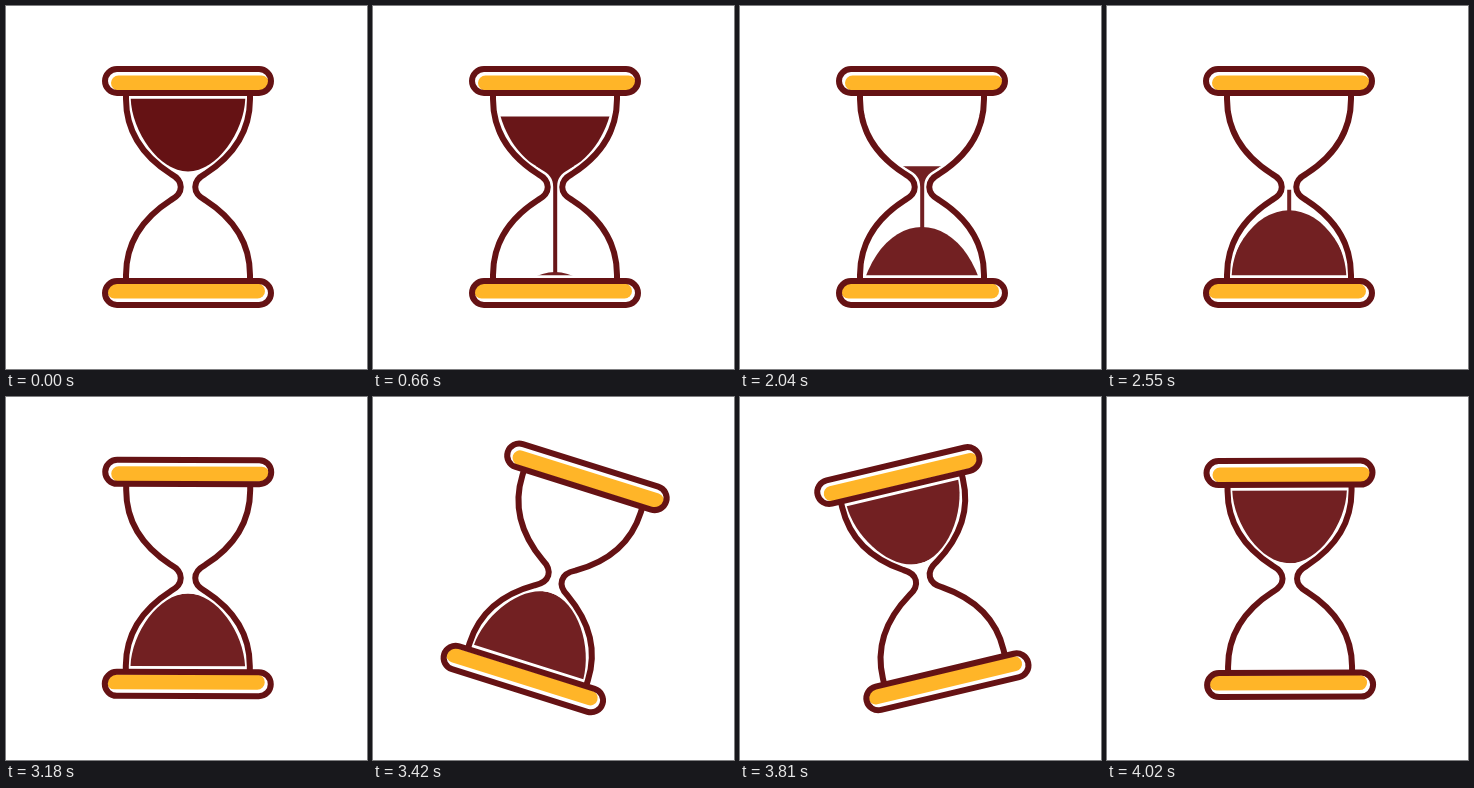
Recreate the animation shown at these times as an HTML page. Size 361 by 363 pixels, loop 4050 ms.

```html
<!DOCTYPE html>
<html lang="en">
<head>
<meta charset="utf-8">
<title>Hourglass</title>
<style>
  html, body { margin: 0; width: 100%; height: 100%; overflow: hidden; background: #fff; }
  svg { display: block; width: 361px; height: 363px; }
</style>
</head>
<body>
<svg viewBox="0 0 361 363">
  <defs>
    <path id="bowl" d="M124.700 92.800C126 126 153 165.500 182 165.500S238 126 239.300 92.800Z"/>
    <clipPath id="dome"><use href="#bowl" transform="rotate(180 182 181)"/></clipPath>
    <clipPath id="above"><rect id="level" width="361" height="363"/></clipPath>
    <clipPath id="flow"><rect id="stream" width="361"/></clipPath>
    <path id="side" d="M120 87V93C120 128 140 152 165 168C178 175 178 187 165 194C140 210 120 234 120 269V275"/>
    <g id="cap">
      <rect x="99" y="63" width="166" height="24" rx="12" fill="#fff"/>
      <rect x="105" y="69.5" width="158" height="15" rx="7.5" fill="#ffb528"/>
      <rect x="99" y="63" width="166" height="24" rx="12" fill="none" stroke="#651214" stroke-width="6"/>
    </g>
  </defs>
  <g id="glass">
    <g id="sand">
      <g clip-path="url(#above)"><use href="#bowl"/></g>
      <path clip-path="url(#flow)"
        d="M125.500 93C126 126 146 150 169 164C176 168 180.200 172 180.200 181V269H184.200V181C184.200 172 188 168 195 164C218 150 238 126 238.500 93Z"/>
    </g>
    <g clip-path="url(#dome)"><ellipse id="pile" cx="182" rx="64.2" ry="95.5" fill="#722022"/></g>
    <g fill="none" stroke="#651214" stroke-width="6">
      <use href="#side"/>
      <use href="#side" transform="rotate(180 182 181)"/>
    </g>
    <use href="#cap"/>
    <use href="#cap" transform="rotate(180 182 181)"/>
  </g>
</svg>
<script>
  const LOOP = 4050, TURN_START = 3153, TURN_TIME = 900;
  const $ = id => document.getElementById(id);
  const clamp = v => Math.max(0, Math.min(1, v));

  // Cubic Bezier (.7, 0, .3, 1), solved for x by bisection.
  function ease(x) {
    let lo = 0, hi = 1, s = x;
    for (let i = 0; i < 24; i++) {
      s = (lo + hi) / 2;
      const bx = 3 * (1 - s) ** 2 * s * .7 + 3 * (1 - s) * s * s * .3 + s ** 3;
      if (bx < x) lo = s; else hi = s;
    }
    return s * s * (3 - 2 * s);
  }

  function draw(t) {
    const level = 86.5 + .0362 * t;
    $('level').setAttribute('y', level);

    // The stream falls from the neck, then its tail drops away.
    const top = Math.max(160, level, 177.5 + .2 * (t - 2520));
    const bottom = Math.min(269, 160 + .21 * t);
    $('stream').setAttribute('y', top);
    $('stream').setAttribute('height', Math.max(0, bottom - top));

    const fade = clamp(t / 2100);
    const mix = (a, b) => Math.round(a + (b - a) * fade);
    $('sand').setAttribute('fill', `rgb(${mix(101, 114)},${mix(18, 32)},${mix(20, 34)})`);

    const peak = 196.5 + .0327 * Math.max(0, 2790 - t);
    $('pile').setAttribute('cy', peak + 95.5);

    const turn = clamp((t - TURN_START) / TURN_TIME);
    const angle = turn ? 180 * ease(turn) : 0;
    $('glass').setAttribute('transform', `rotate(${angle} 182.4 181.4)`);
  }

  const start = performance.now();
  function tick() {
    draw((performance.now() - start) % LOOP);
    requestAnimationFrame(tick);
  }
  tick();
</script>
</body>
</html>
```
